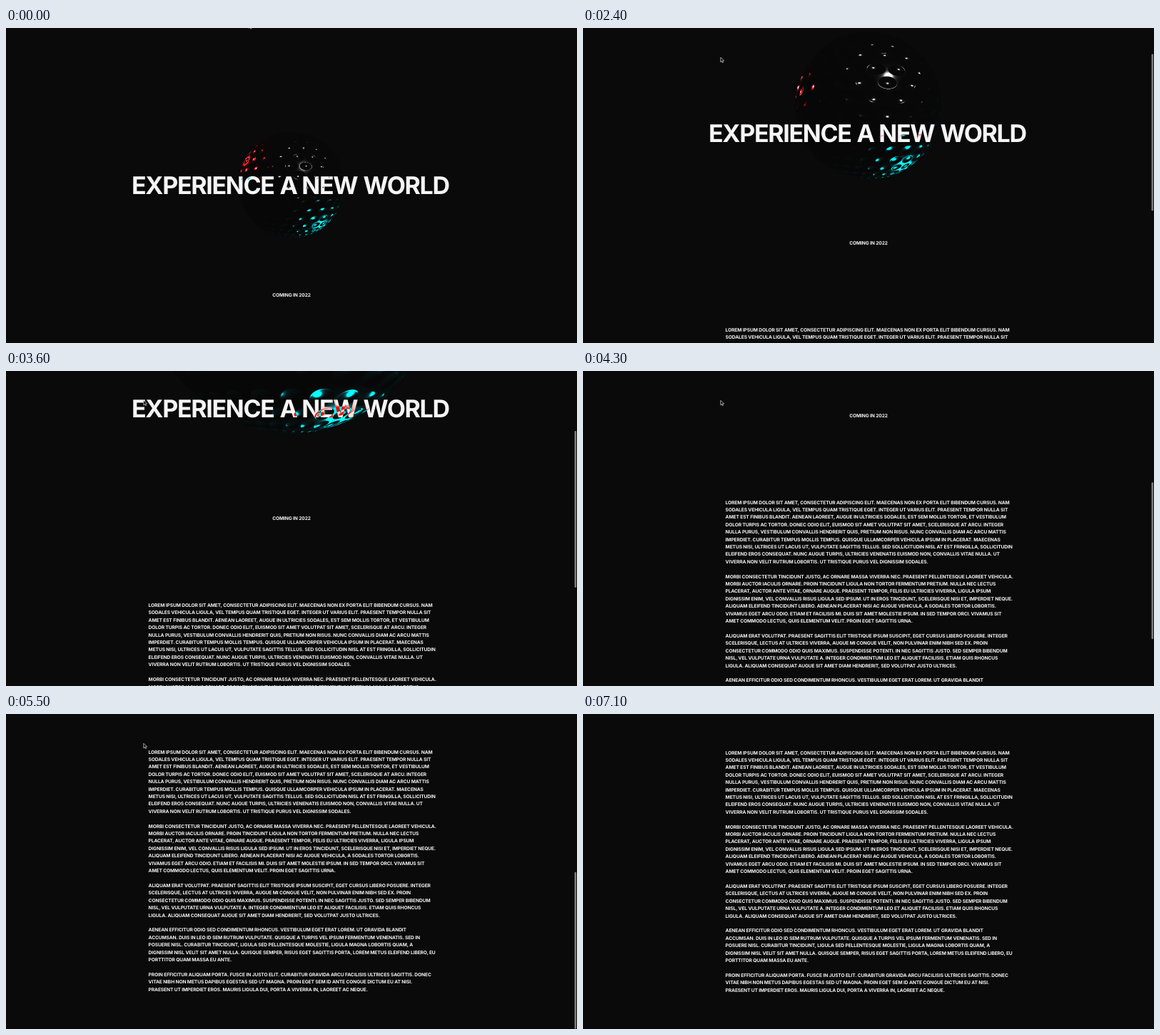
An HTML page with a canvas that plays this animation: 800x442 px, repeating every 7.9 s.

```html
<!DOCTYPE html>
<html lang="en">
<head>
<meta charset="utf-8">
<title>Experience a new world</title>
<style>
  html, body { margin: 0; width: 100%; height: 100%; overflow: hidden; background: #0a0a0a; }
  #stage { position: relative; width: 100%; height: 100%; overflow: hidden; background: #0a0a0a; isolation: isolate; }
  #stage > * { position: absolute; left: 0; top: 0; width: 100%; height: 100%; display: block; }
  #page { mix-blend-mode: difference; }
  text { font-family: Inter, "Liberation Sans", sans-serif; font-weight: 700; fill: #fff; text-rendering: geometricPrecision; }
  .title { font-size: 34px; letter-spacing: -1.3px; }
  .copy { font-size: 6.65px; letter-spacing: -.11px; }
</style>
</head>
<body>
<div id="stage">
  <canvas id="ball" width="1600" height="884"></canvas>
  <svg id="page" viewBox="0 0 800 442">
    <g id="scroller">
      <text class="title" y="232.8"><tspan x="176">EXPERIENCE</tspan> <tspan x="383.5">A</tspan> <tspan x="414.3">NEW</tspan> <tspan x="500.5">WORLD</tspan></text>
      <text class="copy" x="400" y="377" text-anchor="middle">COMING IN 2022</text>
      <g id="copy"></g>
    </g>
  </svg>
  <svg viewBox="0 0 800 442">
    <rect id="thumb" x="796.5" width="2.6" height="220" rx="1.3" fill="#7c7c7c"/>
    <path id="cursor" d="M0 0V6.6L1.6 5.2L2.6 7.5L3.7 7L2.7 4.8H4.8Z" fill="#0a0a0a" stroke="#ddd" stroke-width=".7"/>
  </svg>
</div>
<script>
const LOOP = 7900, TICK = 100;
const $ = id => document.getElementById(id);

const COPY = `LOREM IPSUM DOLOR SIT AMET, CONSECTETUR ADIPISCING ELIT. MAECENAS NON EX PORTA ELIT BIBENDUM CURSUS. NAM
SODALES VEHICULA LIGULA, VEL TEMPUS QUAM TRISTIQUE EGET. INTEGER UT VARIUS ELIT. PRAESENT TEMPOR NULLA SIT
AMET EST FINIBUS BLANDIT. AENEAN LAOREET, AUGUE IN ULTRICIES SODALES, EST SEM MOLLIS TORTOR, ET VESTIBULUM
DOLOR TURPIS AC TORTOR. DONEC ODIO ELIT, EUISMOD SIT AMET VOLUTPAT SIT AMET, SCELERISQUE AT ARCU. INTEGER
NULLA PURUS, VESTIBULUM CONVALLIS HENDRERIT QUIS, PRETIUM NON RISUS. NUNC CONVALLIS DIAM AC ARCU MATTIS
IMPERDIET. CURABITUR TEMPUS MOLLIS TEMPUS. QUISQUE ULLAMCORPER VEHICULA IPSUM IN PLACERAT. MAECENAS
METUS NISI, ULTRICES UT LACUS UT, VULPUTATE SAGITTIS TELLUS. SED SOLLICITUDIN NISL AT EST FRINGILLA, SOLLICITUDIN
ELEIFEND EROS CONSEQUAT. NUNC AUGUE TURPIS, ULTRICIES VENENATIS EUISMOD NON, CONVALLIS VITAE NULLA. UT
VIVERRA NON VELIT RUTRUM LOBORTIS. UT TRISTIQUE PURUS VEL DIGNISSIM SODALES.

MORBI CONSECTETUR TINCIDUNT JUSTO, AC ORNARE MASSA VIVERRA NEC. PRAESENT PELLENTESQUE LAOREET VEHICULA.
MORBI AUCTOR IACULIS ORNARE. PROIN TINCIDUNT LIGULA NON TORTOR FERMENTUM PRETIUM. NULLA NEC LECTUS
PLACERAT, AUCTOR ANTE VITAE, ORNARE AUGUE. PRAESENT TEMPOR, FELIS EU ULTRICIES VIVERRA, LIGULA IPSUM
DIGNISSIM ENIM, VEL CONVALLIS RISUS LIGULA SED IPSUM. UT IN EROS TINCIDUNT, SCELERISQUE NISI ET, IMPERDIET NEQUE.
ALIQUAM ELEIFEND TINCIDUNT LIBERO. AENEAN PLACERAT NISI AC AUGUE VEHICULA, A SODALES TORTOR LOBORTIS.
VIVAMUS EGET ARCU ODIO. ETIAM ET FACILISIS MI. DUIS SIT AMET MOLESTIE IPSUM. IN SED TEMPOR ORCI. VIVAMUS SIT
AMET COMMODO LECTUS, QUIS ELEMENTUM VELIT. PROIN EGET SAGITTIS URNA.

ALIQUAM ERAT VOLUTPAT. PRAESENT SAGITTIS ELIT TRISTIQUE IPSUM SUSCIPIT, EGET CURSUS LIBERO POSUERE. INTEGER
SCELERISQUE, LECTUS AT ULTRICES VIVERRA, AUGUE MI CONGUE VELIT, NON PULVINAR ENIM NIBH SED EX. PROIN
CONSECTETUR COMMODO ODIO QUIS MAXIMUS. SUSPENDISSE POTENTI. IN NEC SAGITTIS JUSTO. SED SEMPER BIBENDUM
NISL, VEL VULPUTATE URNA VULPUTATE A. INTEGER CONDIMENTUM LEO ET ALIQUET FACILISIS. ETIAM QUIS RHONCUS
LIGULA. ALIQUAM CONSEQUAT AUGUE SIT AMET DIAM HENDRERIT, SED VOLUTPAT JUSTO ULTRICES.

AENEAN EFFICITUR ODIO SED CONDIMENTUM RHONCUS. VESTIBULUM EGET ERAT LOREM. UT GRAVIDA BLANDIT
ACCUMSAN. DUIS IN LEO ID SEM RUTRUM VULPUTATE. QUISQUE A TURPIS VEL IPSUM FERMENTUM VENENATIS. SED IN
POSUERE NISL. CURABITUR TINCIDUNT, LIGULA SED PELLENTESQUE MOLESTIE, LIGULA MAGNA LOBORTIS QUAM, A
DIGNISSIM NISL VELIT SIT AMET NULLA. QUISQUE SEMPER, RISUS EGET SAGITTIS PORTA, LOREM METUS ELEIFEND LIBERO, EU
PORTTITOR QUAM MASSA EU ANTE.

PROIN EFFICITUR ALIQUAM PORTA. FUSCE IN JUSTO ELIT. CURABITUR GRAVIDA ARCU FACILISIS ULTRICES SAGITTIS. DONEC
VITAE NIBH NON METUS DAPIBUS EGESTAS SED UT MAGNA. PROIN EGET SEM ID ANTE CONGUE DICTUM EU AT NISI.
PRAESENT UT IMPERDIET EROS. MAURIS LIGULA DUI, PORTA A VIVERRA IN, LAOREET AC NEQUE.`;

COPY.split('\n').forEach((line, i) => {
  if (!line) return;
  const el = document.createElementNS('http://www.w3.org/2000/svg', 'text');
  el.setAttribute('class', 'copy');
  el.setAttribute('x', 199.6);
  el.setAttribute('y', (499 + i * 10.41).toFixed(2));
  el.textContent = line;
  $('copy').append(el);
});

// Smooth curve through [time, value] keys
function curve(keys) {
  const last = keys.length - 1;
  const slope = i => i < 1 || i >= last ? 0
    : (keys[i + 1][1] - keys[i - 1][1]) / (keys[i + 1][0] - keys[i - 1][0]);
  return t => {
    if (t <= keys[0][0]) return keys[0][1];
    if (t >= keys[last][0]) return keys[last][1];
    const i = keys.findIndex(k => k[0] > t) - 1;
    const [t0, a] = keys[i], [t1, b] = keys[i + 1];
    const h = t1 - t0, u = (t - t0) / h, v = 1 - u;
    return a * v * v * (1 + 2 * u) + b * u * u * (3 - 2 * u)
      + h * u * v * (slope(i) * v - slope(i + 1) * u);
  };
}

const scrollAt = curve([[1700, 0], [2000, 27], [2400, 73], [2900, 117], [3300, 149], [3600, 168],
  [4000, 228], [4300, 312.5], [4800, 385], [5200, 430], [5500, 443.5], [5700, 444], [5800, 444], [6200, 442.5]]);
const leaveX = curve([[6700, 192.8], [6800, 262], [6900, 400], [7000, 505]]);
const leaveY = curve([[6700, 41.2], [6800, 150], [6900, 243], [7000, 11]]);

// Ray-cast dimpled sphere, units as in a scene with the camera at z = 2
const SS = 2, FOCAL = 288, RADIUS = .5, CENTER = 220.3;
const COLS = 28, ROWS = 22, DIMPLE = .46, DEPTH = .75, ALPHA2 = .0016;
const LIGHTS = [
  { pos: [2, 3, 4], power: .25, rgb: [1, 1, 1] },
  { pos: [-1.86, 1, -1.65], power: 5, rgb: [1, .02, .03] },
  { pos: [2.13, -3, -1.98], power: 5, rgb: [0, .88, .95] }
];
const ctx = $('ball').getContext('2d');

function dimpleNormal(x, y, z, spin) {
  const ring = Math.hypot(x, z) || 1e-6;
  const v = Math.asin(Math.max(-1, Math.min(1, y))) / Math.PI * ROWS, row = Math.round(v);
  const u = (Math.atan2(x, z) - spin) / (2 * Math.PI) * COLS + (row & 1) * .5;
  const p = (u - Math.round(u)) / DIMPLE, q = (v - row) / DIMPLE, e = Math.hypot(p, q);
  if (e >= 1) return [x, y, z];
  const k = DEPTH * Math.min(1, (1 - e) * 5), a = k * p, b = k * q;
  const nx = x - a * z / ring + b * x * y / ring;
  const ny = y - b * ring;
  const nz = z + a * x / ring + b * z * y / ring;
  const m = Math.hypot(nx, ny, nz);
  return [nx / m, ny / m, nz / m];
}

function shade(P, n, view, out) {
  out[0] = out[1] = out[2] = 7;
  const nv = Math.max(.15, n[0] * view[0] + n[1] * view[1] + n[2] * view[2]);
  for (const { pos, power, rgb } of LIGHTS) {
    let lx = pos[0] - P[0], ly = pos[1] - P[1], lz = pos[2] - P[2];
    const l = Math.hypot(lx, ly, lz);
    lx /= l; ly /= l; lz /= l;
    const nl = n[0] * lx + n[1] * ly + n[2] * lz;
    if (nl <= 0) continue;
    const hx = lx + view[0], hy = ly + view[1], hz = lz + view[2];
    const nh = (n[0] * hx + n[1] * hy + n[2] * hz) / Math.hypot(hx, hy, hz);
    const spread = 1 - nh * nh + ALPHA2;
    const gloss = .0375 * ALPHA2 / (spread * spread) / nv * Math.min(1, nl * 6);
    const lit = 255 * power * (gloss + .012 * nl);
    for (let c = 0; c < 3; c++) out[c] += lit * rgb[c];
  }
}

function drawBall(t, scroll) {
  ctx.clearRect(0, 0, 1600, 884);
  if (scroll > 230) return;
  const cy = .0024 * scroll, d = 2 - .007 * scroll, cz = 2 - d;
  const dist2 = cy * cy + d * d;
  const aim = Math.atan2(cy, d), half = Math.asin(RADIUS / Math.sqrt(dist2));
  const mid = CENTER - scroll;
  const top = aim + half > 1.5 ? 0 : Math.max(0, Math.floor(mid - FOCAL * Math.tan(aim + half)) - 1);
  const bottom = Math.ceil(mid - FOCAL * Math.tan(aim - half)) + 1;
  if (bottom <= top) return;
  const reach = Math.min(400, Math.ceil(FOCAL * RADIUS / Math.sqrt(Math.max(.1, d * d - .25))) + 1);
  const w = reach * 2 * SS, h = (bottom - top) * SS;
  const img = ctx.createImageData(w, h), px = img.data;
  const spin = .5 * t / 1000, rgb = [0, 0, 0];
  for (let j = 0, o = 0; j < h; j++) {
    const ry = (mid - top - (j + .5) / SS) / FOCAL;
    for (let i = 0; i < w; i++, o += 4) {
      const rx = ((i + .5) / SS - reach) / FOCAL;
      const len = Math.sqrt(rx * rx + ry * ry + 1);
      const along = (ry * cy + d) / len;
      const disc = along * along - dist2 + RADIUS * RADIUS;
      if (disc <= 0) continue;
      const s = (along - Math.sqrt(disc)) / len;
      const P = [rx * s, ry * s, 2 - s];
      const n = dimpleNormal(P[0] / RADIUS, (P[1] - cy) / RADIUS, (P[2] - cz) / RADIUS, spin);
      shade(P, n, [-rx / len, -ry / len, 1 / len], rgb);
      px[o] = rgb[0]; px[o + 1] = rgb[1]; px[o + 2] = rgb[2]; px[o + 3] = 255;
    }
  }
  ctx.putImageData(img, (400 - reach) * SS, top * SS);
}

function drawCursor(t) {
  const rest = Math.pow(1 - Math.min(1, t / 800), 2);
  const x = t < 6700 ? 192.8 + 147.5 * rest : leaveX(t);
  const y = t < 6700 ? 41.2 - 47.5 * rest : leaveY(t);
  $('cursor').setAttribute('transform', `translate(${x.toFixed(2)} ${y.toFixed(2)})`);
  $('cursor').setAttribute('visibility', t < 7100 ? 'visible' : 'hidden');
}

function render(t) {
  const scroll = scrollAt(t);
  $('scroller').setAttribute('transform', `translate(0 ${-scroll.toFixed(2)})`);
  $('thumb').setAttribute('y', Math.min(222, scroll / 2).toFixed(2));
  $('thumb').setAttribute('opacity', t <= 1700 ? 0 : Math.max(0, Math.min(1, (6200 - t) / 400)));
  drawCursor(t);
  drawBall(t, scroll);
}

let shown = -1;
const start = performance.now();
function loop() {
  const t = (performance.now() - start) % LOOP;
  const step = t - t % TICK;
  if (step !== shown) render(shown = step);
  requestAnimationFrame(loop);
}
loop();
</script>
</body>
</html>
```
